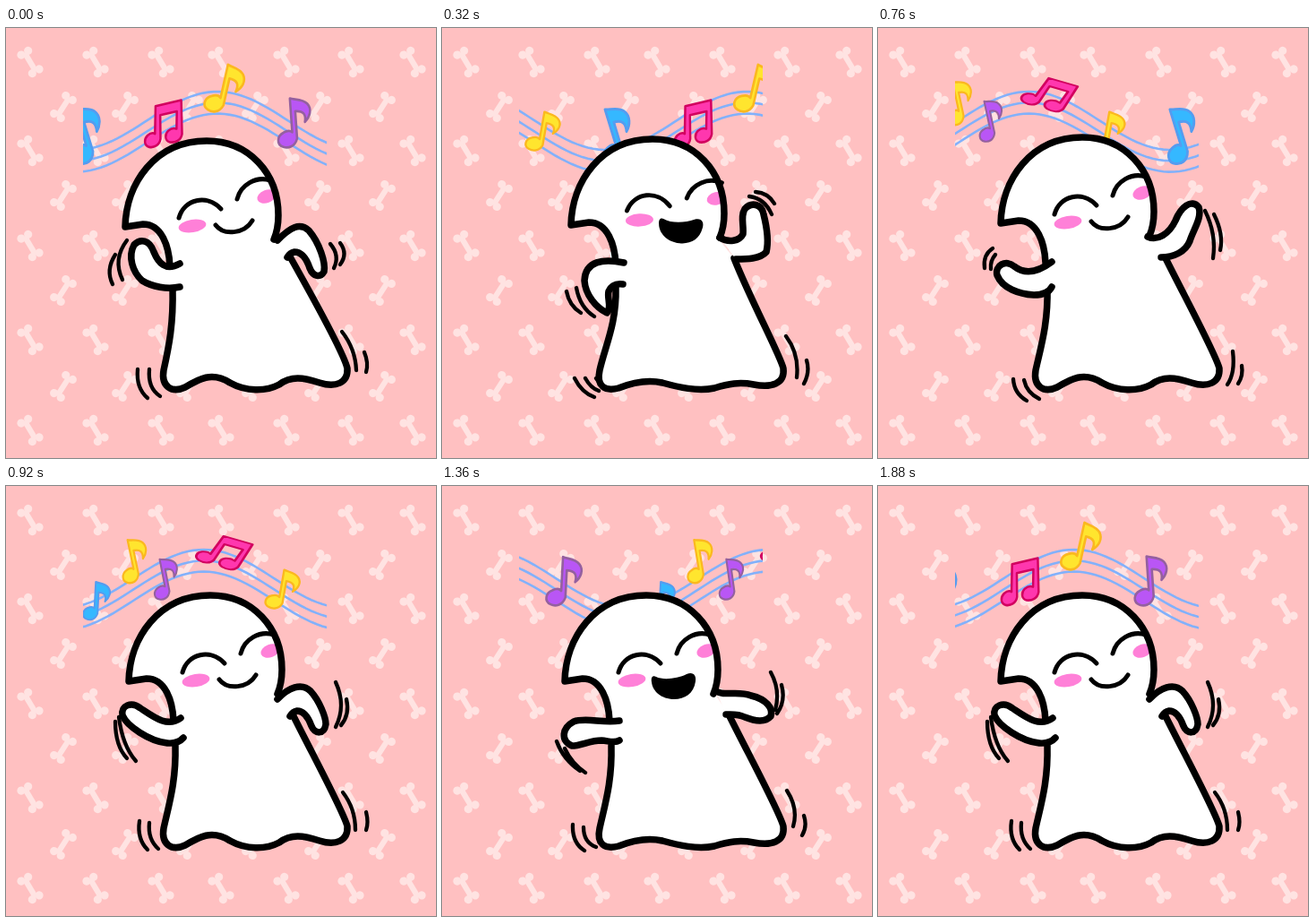
Write an HTML page that moves like this. It is 480x480 px and loops after 1920 ms.

```html
<!DOCTYPE html>
<html lang="en">
<head>
<meta charset="utf-8">
<title>Dancing ghost</title>
<style>
html, body { margin: 0; width: 100%; height: 100%; overflow: hidden; background: #ffc0c1; }
svg { display: block; width: 100vw; height: 100vh; }
.ink { fill: none; stroke: #000; stroke-width: 7.5; stroke-linecap: round; stroke-linejoin: round; }
.arm { fill: #fff; }
.thin { stroke-width: 5; }
.swish { stroke-width: 4.3; }
</style>
</head>
<body>
<svg viewBox="0 0 480 480">
  <defs>
    <clipPath id="window"><rect x="86" y="30" width="272" height="140"/></clipPath>
    <g id="bone">
      <path d="M-12 0H12" stroke="#ffe3e2" stroke-width="6.2"/>
      <g fill="#ffe3e2">
        <circle cx="-12" cy="-4.5" r="4.6"/><circle cx="-12" cy="4.5" r="4.6"/>
        <circle cx="12" cy="-4.5" r="4.6"/><circle cx="12" cy="4.5" r="4.6"/>
      </g>
    </g>
    <g id="single" stroke-width="2.6" stroke-linejoin="round">
      <path d="M6 -7V-43C11 -41 20 -42 25 -36C30 -30 27 -22 21 -17C23 -25 20 -29 11 -29V0C8 9 0 10 -5 8C-13 5 -11 -4 -4 -7C0 -9 4 -9 6 -7Z"/>
    </g>
    <g id="pair" stroke-width="2.6" stroke-linejoin="round">
      <path d="M5 -6L13 -36H44L36 1C33 8 26 9 20 7C14 4 16 -3 21 -6C25 -8 28 -8 31 -6L36 -25H16L10 1C7 8 0 9 -5 7C-11 4 -9 -3 -4 -6C0 -8 3 -8 5 -6Z"/>
    </g>
  </defs>
  <g id="bones"></g>
  <g clip-path="url(#window)">
    <g id="staff" fill="none" stroke="#82b1fb" stroke-width="2.6"></g>
    <g id="notes"></g>
  </g>
  <g id="ghost"></g>
</svg>
<script>
const LOOP = 1920, STEP = 40, POSE_MS = 80;
const SPEED = 0.327, SPAN = 632, CREST = 236;
const byId = id => document.getElementById(id);

// Background
const boneCols = [[27, 100, 173, 240, 313, 385, 454], [64, 133, 205, 278, 348, 420]];
byId('bones').innerHTML = [38, 88, 137, 187, 243, 293, 348, 400, 449].map((y, row) =>
  boneCols[row % 2].map(x =>
    `<use href="#bone" transform="translate(${x} ${y}) rotate(${row % 2 ? -57 : 59})"/>`).join('')).join('');

// Music: a wave and its notes drift right together
const waveY = x => 103.5 - 32.5 * Math.cos((x - CREST) * 4 * Math.PI / SPAN);
let wave = '';
for (let x = -SPAN; x <= SPAN; x += 6) wave += `${wave ? 'L' : 'M'}${x} ${waveY(x).toFixed(1)}`;
byId('staff').innerHTML = [0, 12.3, 24.6].map(dy =>
  `<path d="${wave}" transform="translate(0 ${dy})"/>`).join('');

const colors = {
  blue: ['#35b8ff', '#549cf0'],
  pink: ['#ff37ae', '#d2005f'],
  yellow: ['#ffe52e', '#fbb81f'],
  purple: ['#b956f5', '#94609f']
};
// shape, color, x, y, tilt on the left, tilt on the right, width, height
const notes = [
  ['single', 'blue', 86, 141, -17, -17, 1.05, 1.17],
  ['pair', 'pink', 163, 125, -13, -13, 0.95, 1],
  ['single', 'yellow', 232, 84, 12, 13, 1, 1.06],
  ['single', 'purple', 314, 124, 3, -4, 1, 1.05],
  ['single', 'yellow', -2, 129, 10, 10, 0.9, 0.86],
  ['pair', 'pink', -79, 79, 16, 16, 1.08, 0.78],
  ['single', 'purple', -127, 119, -12, -8, 0.8, 0.86],
  ['single', 'yellow', -162, 100, -12, -9, 0.84, 0.92],
  ['single', 'blue', -207, 142, 3, 3, 0.76, 0.82]
];
byId('notes').innerHTML = notes.map(([shape, color]) =>
  `<use href="#${shape}" fill="${colors[color][0]}" stroke="${colors[color][1]}"/>`).join('');
const noteEls = [...byId('notes').children];

function drawMusic(t) {
  const shift = SPEED * t;
  byId('staff').setAttribute('transform', `translate(${shift % (SPAN / 2)} 0)`);
  notes.forEach(([, , x0, y, left, right, w, h], i) => {
    let x = x0 + shift;
    if (x > 420) x -= SPAN;
    const k = Math.min(1, Math.max(0, (x - 130) / 170));
    noteEls[i].setAttribute('transform',
      `translate(${x} ${y}) rotate(${left + (right - left) * k}) scale(${w} ${h})`);
  });
}

// Ghost: where the head, face and waist sit for each lean
const heads = {
  left: { head: [-4, 4], face: [-4, 4], turn: 0, waist: -3 },
  nod: { head: [-4, 4], face: [1, 0], turn: 6, waist: -3 },
  mid: { head: [0, 0], face: [0, 0], turn: 0, waist: 0 },
  right: { head: [7, 2], face: [10, 2], turn: 6, waist: 5 }
};
const headPath = '187 262C186 240 178 215 157 215L137 218C138 170 170 122 228 122C275 122 308 158 308 205C308 217 306 225 303 232';
const hems = {
  smile: 'C173 400 185 408 200 401C215 392 230 383 250 396C268 406 290 406 305 398C318 388 332 390 350 396C368 402 382 396 381 380',
  open: 'C172 400 182 406 197 402C212 396 228 392 246 396C264 401 285 406 304 402C320 397 332 395 348 398C368 402 383 397 381 380'
};
const mouths = {
  smile: '<path class="ink thin" d="M238 216C247 228 270 226 279 211"/>',
  open: '<path d="M239 213C247 217 263 215 273 210C281 207 284 212 283 218C281 232 271 238 259 238C245 238 235 229 234 219C233 214 235 211 239 213Z"/>'
};
const arms = {
  A: {
    left: 'M194 263C178 272 170 262 165 250C160 236 150 235 143 242C136 255 141 272 152 282C163 289 180 292 194 289',
    right: 'M303 237C318 222 328 217 338 226C350 240 357 262 355 272C351 279 343 278 339 268C335 256 330 250 322 250Q317 251 314 256',
    swish: 'M122 253Q111 270 119 286M135 237Q119 258 130 281M362 241Q373 254 366 268M373 240Q382 252 373 264M147 381Q145 402 158 413M160 381Q158 402 172 411M375 339Q390 358 391 382M400 362Q405 374 402 384'
  },
  B: {
    left: 'M203 262C180 257 160 260 159 282C160 298 172 312 184 318C190 312 184 302 186 294C189 287 195 285 202 286',
    right: 'M310 234C320 240 332 238 336 230C337 220 333 210 338 202C345 194 357 196 359 208C362 220 365 238 362 250C355 258 340 258 328 258',
    swish: 'M139 294Q142 310 155 318M150 290Q154 312 170 322M343 188Q360 190 368 208M350 183Q364 184 371 196M148 391Q156 407 170 412M160 391Q166 402 175 405M172 391Q178 400 186 403M384 344Q399 364 396 390M407 371Q411 384 404 397'
  },
  C: {
    left: 'M196 263C185 268 178 268 172 252C165 238 155 235 148 245C143 262 147 280 158 287C172 294 183 294 194 289',
    right: 'M305 236C318 224 328 216 340 224C354 236 360 255 360 265C359 275 347 275 344 265C340 252 332 246 325 248L314 258',
    swish: 'M132 234Q138 227 150 229M139 240Q143 233 155 232M357 285Q369 278 371 255M365 280Q378 272 378 256M153 380Q149 398 160 413M164 384Q161 402 174 414M386 346Q397 365 390 390M404 372Q405 381 399 389'
  },
  D: {
    left: 'M195 259C180 270 165 258 150 248C140 240 128 245 130 256C135 268 160 285 180 287Q192 288 198 281',
    right: 'M303 238C315 225 330 219 340 229C350 240 357 258 357 266C355 278 345 277 341 268C337 257 332 251 325 251Q320 252 317 257',
    swish: 'M122 263Q122 290 135 304M126 258Q130 290 145 307M368 219Q380 245 368 269M380 238Q384 255 374 267M149 374Q146 394 158 406M160 376Q158 394 170 405M376 342Q390 360 390 384M402 364Q405 376 402 384'
  },
  E: {
    left: 'M198 262C180 265 160 258 147 263C134 270 132 284 145 290C155 290 165 284 178 284C188 285 193 287 198 284',
    right: 'M306 229C315 235 330 228 345 234C362 238 370 248 367 257C360 265 348 262 338 258C330 254 322 255 317 255',
    swish: 'M128 285Q135 305 154 318M137 293Q145 310 160 320M367 208Q378 228 372 250M379 222Q384 240 374 254M146 378Q145 398 159 407M158 381Q158 398 172 403M385 340Q398 360 392 380M404 368Q408 380 402 390'
  },
  F: {
    left: 'M194 261C182 270 166 277 152 266C143 258 130 265 133 276C139 291 158 297 174 298C184 298 191 295 194 289',
    right: 'M301 233C312 238 325 230 332 215C338 200 350 190 358 200C362 212 352 225 348 238C343 250 330 256 316 256',
    swish: 'M119 268Q117 253 128 246M126 269Q125 260 131 253M365 204Q378 230 374 257M375 208Q386 230 382 248M151 392Q152 408 166 416M163 393Q166 407 180 414M396 361Q399 385 390 398M406 377Q408 388 402 397'
  }
};
// lean, mouth, arms for each beat
const poses = [
  ['left', 'smile', 'A'], ['left', 'smile', 'C'], ['nod', 'smile', 'F'], ['mid', 'open', 'F'],
  ['right', 'open', 'B'], ['mid', 'open', 'E'], ['left', 'open', 'A'], ['left', 'open', 'C'],
  ['nod', 'open', 'F'], ['mid', 'smile', 'F'], ['right', 'smile', 'B'], ['mid', 'smile', 'D']
];

function ghost([lean, mouth, arm]) {
  const { head, face, turn, waist } = heads[lean];
  const headAt = `transform="translate(${head})"`;
  const body = `M${189 + waist} 290C${190 + waist} 330 182 355 176 382${hems[mouth]}C378 366 345 305 ${321 + waist} 257`;
  const { left, right, swish } = arms[arm];
  return `<g visibility="hidden">
    <path fill="#fff" d="${body}L300 225L187 250Z"/>
    <path fill="#fff" ${headAt} d="M${headPath}L300 265L190 290Z"/>
    <g transform="translate(${face}) rotate(${turn} 255 200)">
      <ellipse cx="212" cy="217" rx="15.5" ry="7.2" transform="rotate(-9 212 217)" fill="#ff80d8"/>
      <ellipse cx="295" cy="184" rx="11" ry="7.2" transform="rotate(-20 295 184)" fill="#ff80d8"/>
      <path class="ink thin" d="M197 208C203 187 228 181 244 198M262 187C266 171 283 161 299 166"/>
      ${mouths[mouth]}
    </g>
    <path class="ink" ${headAt} d="M${headPath}"/>
    <path class="ink" d="${body}"/>
    <path class="ink arm" d="${left}"/>
    <path class="ink arm" d="${right}"/>
    <path class="ink swish" d="${swish}"/>
  </g>`;
}
byId('ghost').innerHTML = poses.map(ghost).join('');
const poseEls = [...byId('ghost').children];

const start = performance.now();
function draw(now) {
  const t = Math.floor(Math.max(0, now - start) % LOOP / STEP) * STEP;
  const beat = Math.floor(t / POSE_MS) % poses.length;
  drawMusic(t);
  poseEls.forEach((el, i) => el.setAttribute('visibility', i === beat ? 'visible' : 'hidden'));
  requestAnimationFrame(draw);
}
draw(start);
</script>
</body>
</html>
```
